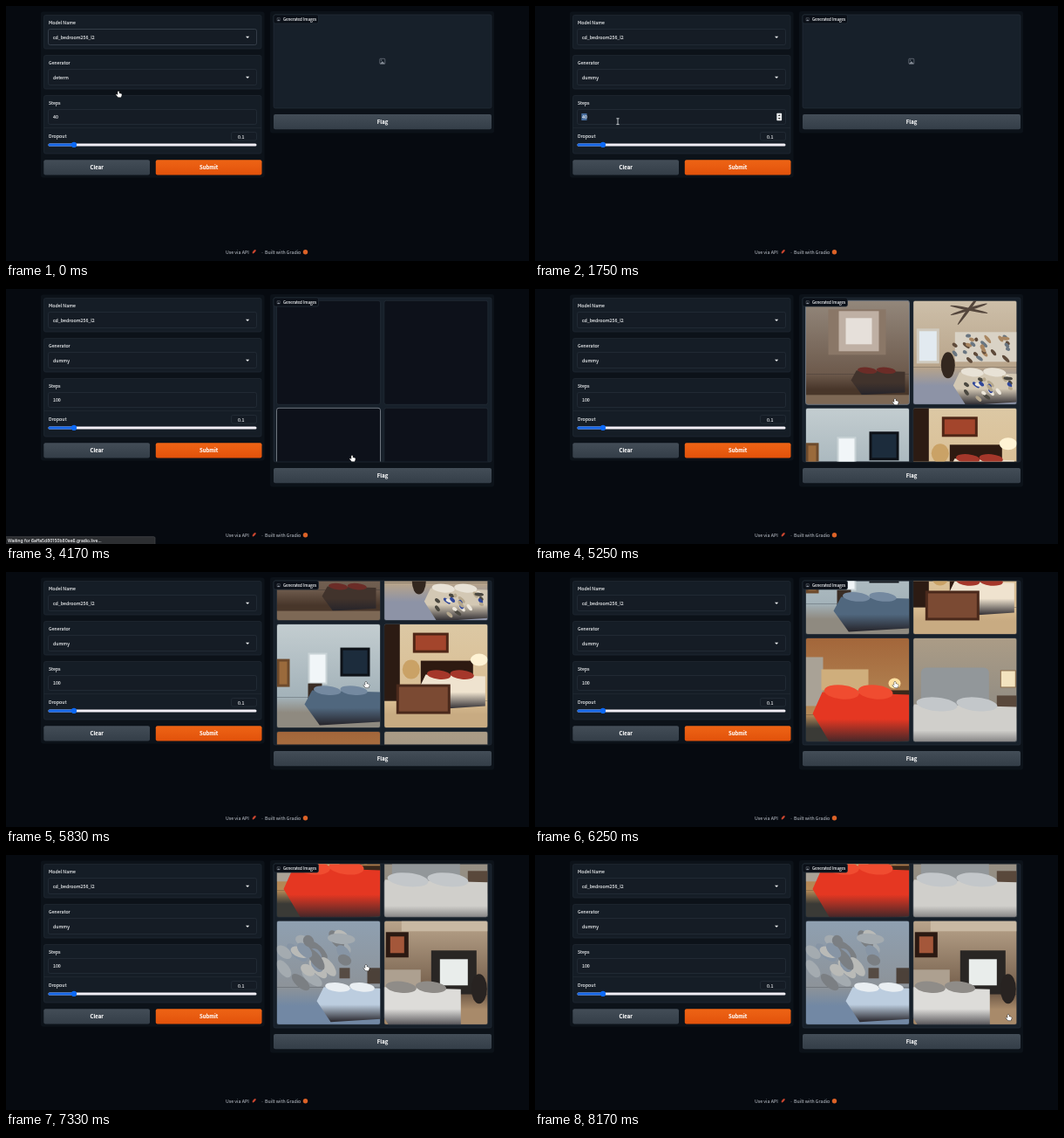
An HTML page with a canvas that plays this animation: 600 by 292 pixels, repeating every 8260 ms.

```html
<!DOCTYPE html>
<html lang="en">
<head>
<meta charset="utf-8">
<title>Image generator demo</title>
<style>
html, body { margin: 0; width: 100%; height: 100%; overflow: hidden; background: #060a10; }
canvas { display: block; width: 600px; height: 292px; }
</style>
</head>
<body>
<canvas></canvas>
<script>
const LOOP = 8260;
const UI = '"Noto Sans CJK JP", "Noto Sans CJK SC", "Open Sans", sans-serif';
const EDGE = '#27313b';
const CELL = 119, PITCH = 123;
const canvas = document.querySelector('canvas');
const ctx = canvas.getContext('2d');
const dpr = window.devicePixelRatio || 1;
canvas.width = 600 * dpr;
canvas.height = 292 * dpr;

// ---- drawing helpers ----
function rect(fill, x, y, w, h) {
  ctx.fillStyle = fill;
  ctx.fillRect(x, y, w, h);
}
function box(x, y, w, h, r, fill, stroke, line = 0.7) {
  ctx.beginPath();
  ctx.roundRect(x, y, w, h, r);
  if (fill) { ctx.fillStyle = fill; ctx.fill(); }
  if (stroke) { ctx.strokeStyle = stroke; ctx.lineWidth = line; ctx.stroke(); }
}
function oval(fill, x, y, rx, ry = rx, turn = 0) {
  ctx.beginPath();
  ctx.ellipse(x, y, rx, ry, turn, 0, 7);
  ctx.fillStyle = fill;
  ctx.fill();
}
function triangle(fill, x, y, r, h) {
  ctx.beginPath();
  ctx.moveTo(x - r, y);
  ctx.lineTo(x + r, y);
  ctx.lineTo(x, y + h);
  ctx.fillStyle = fill;
  ctx.fill();
}
function fade(y0, y1, ...colors) {
  const g = ctx.createLinearGradient(0, y0, 0, y1);
  colors.forEach((c, i) => g.addColorStop(i / (colors.length - 1), c));
  return g;
}
// Set large and scaled down so that small type keeps fractional advances.
function text(str, x, y, { size = 5.28, color = '#f0f2f4', align = 'left', weight = 400, font = UI } = {}) {
  ctx.save();
  ctx.translate(x, y);
  ctx.scale(0.1, 0.1);
  ctx.font = `${weight} ${size * 10}px ${font}`;
  ctx.textAlign = align;
  ctx.textBaseline = 'middle';
  ctx.fillStyle = ctx.strokeStyle = color;
  ctx.lineWidth = 1;
  ctx.fillText(str, 0, 0);
  ctx.strokeText(str, 0, 0);
  ctx.restore();
}

// ---- timing ----
const smooth = u => (u = Math.min(1, Math.max(0, u)), u * u * (3 - 2 * u));
const between = (t, from, to) => t >= from && t < to;

// Pointer rests: arrive, leave, x, y.
const rests = [
  [0, 0, 129, 98], [280, 520, 125, 84], [880, 1100, 78, 128], [1400, 1560, 58, 129],
  [1740, 2280, 95, 132], [2600, 3250, 232, 186], [4050, 4330, 397, 191],
  [4980, 7420, 413, 126], [8080, LOOP, 543, 183]
];
function pointerAt(t) {
  const i = rests.findLastIndex(r => r[0] <= t);
  const [, leave, x, y] = rests[i];
  const [arrive, , nx, ny] = rests[i + 1] || rests[i];
  const u = t < leave ? 0 : smooth((t - leave) / (arrive - leave));
  return [x + (nx - x) * u, y + (ny - y) * u];
}
const scrollAt = t => 307 * smooth((t - 5260) / 1750);

// ---- photo parts, in a 119 x 119 cell ----
function room(ceiling, wall, floor, horizon) {
  rect(fade(0, horizon, ceiling, wall), 0, 0, CELL, horizon);
  rect(fade(horizon, CELL, wall, floor, floor), 0, horizon, CELL, CELL - horizon);
}
function framed(frame, fill, x, y, w, h, rim = 3) {
  rect(frame, x, y, w, h);
  rect(fill, x + rim, y + rim, w - 2 * rim, h - 2 * rim);
}
function bed(cover, pillow, x, y, w, h) {
  ctx.beginPath();
  ctx.moveTo(x + w * 0.1, y);
  ctx.lineTo(x + w, y + h * 0.05);
  ctx.lineTo(x + w, y + h * 0.9);
  ctx.lineTo(x + w * 0.2, y + h);
  ctx.lineTo(x, y + h * 0.4);
  ctx.fillStyle = fade(y, y + h, cover, cover, '#26242a');
  ctx.fill();
  for (const k of [0.3, 0.65]) oval(pillow, x + w * k, y, w * 0.18, h * 0.13, 0.1);
}
// Seeded patches for quilts, shelves and haze.
function patches(colors, count, x, y, w, h, size) {
  let seed = 7;
  const random = () => (seed = seed * 16807 % 2147483647) / 2147483647;
  random();
  for (let i = 0; i < count; i++) {
    oval(colors[i % colors.length], x + random() * w, y + random() * h, size * (0.5 + random()), size * 0.5, random());
  }
}

const photos = [
  () => { // brown room with curtains
    room('#93877b', '#6d5a4c', '#48362a', 84);
    rect('#8a7767', 26, 10, 66, 52);
    framed('#bfb0a4', '#e6e0da', 38, 12, 46, 46, 8);
    bed('#41332c', '#6b2c27', 52, 80, 62, 28);
    rect('#7d6855', 0, 108, CELL, 11);
  },
  () => { // bright room with a fan, shelves and a quilt
    room('#cdbfa9', '#b8a48a', '#8d93a6', 76);
    for (const turn of [0.2, -0.3, 2.2]) oval('#54463c', 64, 10, 22, 1.6, turn);
    framed('#cfc9bd', '#e2eaf0', 4, 32, 26, 40);
    rect('#d9d2c5', 48, 36, 71, 34);
    patches(['#5e4a3a', '#6a7681', '#a98661'], 26, 44, 40, 70, 30, 4);
    oval('#33271f', 40, 74, 8, 15);
    bed('#d3c8b4', '#e8e2d6', 46, 82, 73, 38);
    patches(['#4b4840', '#b5a78c', '#eee8dc', '#30479a'], 22, 58, 86, 58, 28, 4);
  },
  () => { // pale room with a navy bed
    room('#c3cdd0', '#a3b2b9', '#8f8a80', 84);
    framed('#6d4a2c', '#9a6a3c', 0, 40, 15, 32);
    framed('#c9d3d6', '#f1f6f8', 36, 33, 22, 36, 2);
    framed('#0d1117', '#1c2c3c', 73, 27, 34, 33);
    rect('#3a2d25', 36, 68, 16, 18);
    bed('#50677e', '#7489a0', 32, 76, 87, 40);
  },
  () => { // warm room with red pillows
    room('#dcc8a4', '#d9bd92', '#c8ab82', 88);
    rect('#2c1b13', 0, 0, 18, 88);
    framed('#4f2616', '#a3452c', 33, 10, 41, 23);
    oval('#caa266', 31, 52, 10, 11);
    rect('#2e1a11', 42, 42, 60, 28);
    oval('#fff3d4', 109, 41, 10, 7);
    bed('#efe3cf', '#a5372a', 40, 58, 76, 40);
    framed('#4a291b', '#7b4a33', 14, 69, 62, 34);
  },
  () => { // tan room with a red bed
    room('#a3663a', '#b58a58', '#3a3a36', 88);
    rect('#a9a296', 0, 22, 20, 56);
    rect('#cfae7c', 18, 36, 54, 24);
    oval('#ffe0a0', 102, 52, 7, 6);
    rect('#3b281b', 88, 60, 31, 18);
    bed('#e53722', '#f04c30', 8, 62, 111, 62);
  },
  () => { // grey room with a padded headboard
    room('#ab9c86', '#8f8b83', '#a9a7a4', 88);
    box(9, 34, 78, 44, 6, '#92979a');
    framed('#8a6c4a', '#f3e3bf', 100, 37, 18, 20, 1);
    rect('#59483b', 96, 66, 23, 26);
    bed('#d0cfcb', '#c3c7ca', -12, 76, 131, 60);
  },
  () => { // hazy blue room
    room('#8fa0b1', '#8d9399', '#7288a4', 76);
    patches(['#a4abb0', '#7b7f83', '#b9bab7', '#8795a5'], 22, 4, 14, 80, 60, 12);
    rect('#564b43', 72, 54, 12, 12);
    rect('#4c4139', 104, 54, 15, 18);
    bed('#bccddf', '#e9eef2', 46, 76, 80, 40);
  },
  () => { // brown room with a white bed
    room('#b9a48b', '#705a47', '#a88a6a', 84);
    rect('#c9b9a3', 20, 0, 99, 12);
    framed('#2b1912', '#a4573a', 2, 13, 26, 29, 5);
    framed('#292624', '#e9edeb', 54, 34, 52, 50, 10);
    rect('#ada090', 0, 56, 42, 25);
    oval('#282321', 109, 78, 9, 17);
    bed('#dddcd9', '#8f8c88', -10, 76, 98, 50);
  }
];

// ---- interface parts ----
function block(y, h) { box(43.5, y, 249.5, h, 2, '#151d26', '#212a34'); }
function field(y, h = 17, x = 48.5, border = EDGE) { box(x, y, 287.5 - x, h, 2, '#151c25', border); }

function dropdown(y, label, value, active) {
  block(y, 38.5);
  text(label, 49, y + 8);
  field(y + 16, 18, 48.5, active ? '#434c58' : EDGE);
  text(value, 54, y + 25);
  triangle('#f2f4f6', 277.1, y + 24.2, 2.1, 2.2);
}

function button(label, x, y, w, top, bottom) {
  box(x, y, w, 17.2, 2, fade(y, y + 17, top, bottom));
  text(label, x + w / 2, y + 8.7, { size: 5.97, weight: 700, align: 'center', color: '#fff' });
}

function imageIcon(x, y, s, color) {
  box(x - s, y - s, s * 2, s * 2, s / 4, null, color, s / 5);
  oval(color, x - s * 0.4, y - s * 0.4, s * 0.22);
  triangle(color, x, y + s, s, -s);
}

function steps(t) {
  block(102.5, 66.5);
  text('Steps', 49, 111);
  field(118.5);
  if (between(t, 1500, 1830)) rect('#456b9b', 53.3, 123, 6.2, 8);
  const typed = '100'.slice(0, 1 + Math.max(0, Math.floor((t - 1830) / 110)));
  text(t < 1830 ? '40' : typed, 54, 127);
  if (between(t, 1300, 2400)) {
    box(277.3, 122.8, 5.8, 8.4, 0.8, '#eceef0');
    triangle('#333', 280.2, 126, 1.4, -1.8);
    triangle('#333', 280.2, 128, 1.4, 1.8);
  }
  rect('#212a34', 43.5, 139, 249.5, 0.7);
  text('Dropout', 49, 148.5);
  field(144.5, 9.5, 258.5);
  text('0.1', 266, 149.5);
  box(48.5, 157.4, 239, 3, 1.5, '#f1eef5');
  box(48.5, 157.4, 30, 3, 1.5, '#1667e8');
  oval('#0c69f5', 78, 158.9, 3.1);
}

function options(pointerY) {
  box(48.5, 92, 239, 45, 2, '#1b2430', '#2e3845');
  ['determ', 'determ-indiv', 'dummy'].forEach((name, i) => {
    const y = 92 + i * 15;
    if (between(pointerY, y, y + 15)) rect('#2d3846', 49, y + 0.5, 238, 14);
    if (i === 0) text('✓', 51, y + 7.5, { size: 4.5 });
    text(name, 58, y + 7.5);
  });
}

function gallery(t, px, py) {
  const filled = t >= 3000;
  const h = filled ? 188 : 107;
  box(303, 6, 257, h + 32.5, 3, '#0c1219');
  box(307, 10, 250, h, 2, '#17202a', '#232c37');
  if (filled) {
    const scroll = scrollAt(t);
    ctx.save();
    ctx.beginPath();
    ctx.roundRect(307.4, 10.4, 249.2, h - 0.8, 2);
    ctx.clip();
    photos.forEach((paint, i) => {
      const x = 310.5 + i % 2 * (PITCH + 0.3);
      const y = 13.3 + (i >> 1) * PITCH - scroll;
      if (!between(y, -CELL, 198)) return;
      const hover = scroll === 0 && between(px, x, x + CELL) && between(py, y, y + CELL) && py < 176 + 22 && t > 3500;
      ctx.save();
      ctx.translate(x, y);
      box(0, 0, CELL, CELL, 2.5, '#0d111a');
      ctx.clip();
      if (t >= 4500 + i * 45) paint();
      ctx.restore();
      box(x, y, CELL, CELL, 2.5, null, hover ? '#6f767f' : EDGE, hover ? 1 : 0.6);
    });
    ctx.restore();
  } else {
    imageIcon(431.8, 63.3, 3, '#858c96');
  }
  box(307, 10, 51.5, 10, 2, '#0b1018', '#252e39');
  imageIcon(312.7, 15.2, 1.7, '#8b929c');
  text('Generated Images', 318, 15.4, { size: 4.52 });
  button('Flag', 307, h + 17, 250, '#434d57', '#343e48');
}

function footer() {
  const style = { color: '#a3a8b0' };
  text('Use via API', 252, 281.8, style);
  oval('#c9452f', 284.7, 281.2, 2.7, 1.2, -0.8);
  text('·', 292.5, 281.8, style);
  text('Built with Gradio', 297, 281.8, style);
  oval('#dc6227', 343.5, 281.8, 2.7);
}

const beam = new Path2D('M-1.6-3.2H1.6M0-3.2V3.6M-1.6 3.6H1.6');
const hand = new Path2D('M-.8 0Q0-1.2.8 0V2L3.3 2.6Q4 2.8 3.8 4L3 6.6H-.4L-2.8 3.8Q-2.7 2.7-1.6 3.3L-.8 4Z');
function pointer(t, x, y) {
  const typing = between(t, 1250, 2380);
  ctx.save();
  ctx.translate(x, y);
  ctx.strokeStyle = typing ? '#d5d8dc' : '#111';
  ctx.lineWidth = 0.9;
  ctx.stroke(typing ? beam : hand);
  ctx.fillStyle = '#fff';
  if (!typing) ctx.fill(hand);
  ctx.restore();
}

function draw(t) {
  const [px, py] = pointerAt(t);
  const open = between(t, 330, 1040);
  ctx.setTransform(dpr, 0, 0, dpr, 0, 0);
  rect('#060a10', 0, 0, 600, 292);
  box(40, 6.5, 256.5, 190, 3, '#0c1219');
  dropdown(10.5, 'Model Name', 'cd_bedroom256_l2', t < 330);
  dropdown(56.5, 'Generator', t < 1040 ? 'determ' : 'dummy', open);
  steps(t);
  button('Clear', 43.3, 176.2, 121.7, '#434d57', '#343e48');
  button('Submit', 171.8, 176.2, 121.7, '#ee6415', '#e2520b');
  gallery(t, px, py);
  footer();
  if (open) options(py);
  if (between(t, 4170, 4750)) {
    box(-2, 283.7, 173, 10, 1.5, '#2c2e31', '#484a4d');
    text('Waiting for 6affa5d80150b80ae6.gradio.live...', 2, 288.3, { size: 5, font: 'Inter, Roboto, sans-serif' });
  }
  pointer(t, px, py);
}

const start = performance.now();
function tick() {
  draw((performance.now() - start) % LOOP);
  requestAnimationFrame(tick);
}
tick();
</script>
</body>
</html>
```
